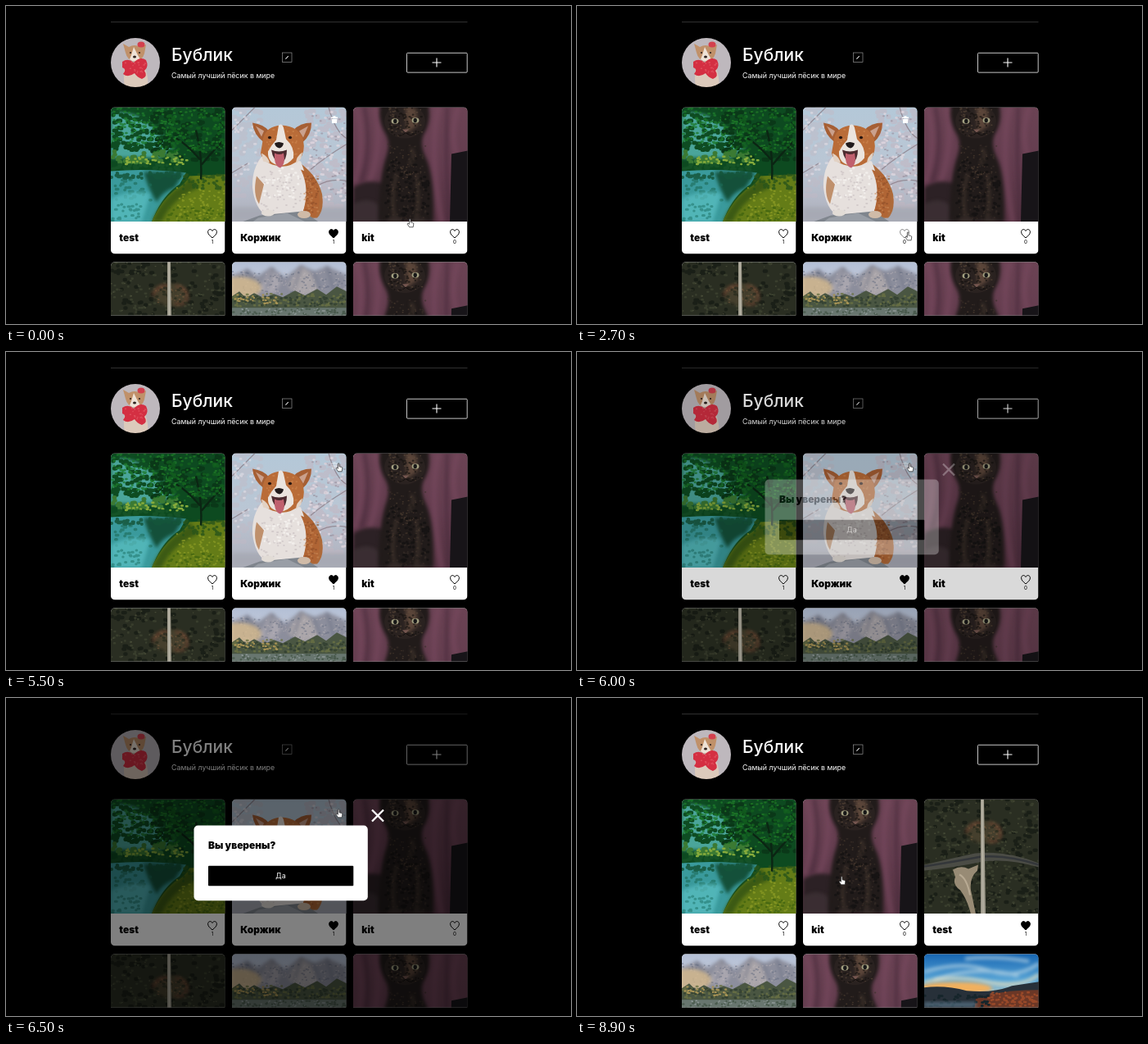
Recreate the animation shown at these times as an HTML page. Size 690x388 px, loop 9.3 s.

```html
<!DOCTYPE html>
<html lang="ru">
<head>
<meta charset="utf-8">
<style>
  html, body { margin: 0; width: 100%; height: 100%; overflow: hidden; background: #000; }
  svg { display: block; width: 100%; height: 100%; font-family: Inter, Roboto, sans-serif; }
</style>
</head>
<body>
<svg id="stage" viewBox="0 0 690 388"></svg>
<script>
const LOOP = 9300, STEP = 100;

function random(seed) {
  return () => (seed = (seed * 16807) % 2147483647) / 2147483647;
}

// Scatters round specks of one colour over a box.
function specks(seed, count, [x, y, w, h], color, size, opacity = 1) {
  const next = random(seed * 7919 + 13);
  let d = '';
  for (let i = 0; i < count; i++) {
    d += `M${(x + next() * w).toFixed(1)} ${(y + next() * h).toFixed(1)}h${(next() * size * .7).toFixed(1)}`;
  }
  return `<path d="${d}" fill="none" stroke="${color}" stroke-width="${size}" stroke-linecap="round" opacity="${opacity}"/>`;
}

const shape = (d, fill, extra = '') => `<path d="${d}" fill="${fill}" ${extra}/>`;
const line = (d, color, width, extra = '') =>
  `<path d="${d}" fill="none" stroke="${color}" stroke-width="${width}" ${extra}/>`;
const oval = (x, y, rx, ry, fill, extra = '') =>
  `<ellipse cx="${x}" cy="${y}" rx="${rx}" ry="${ry}" fill="${fill}" ${extra}/>`;
const rect = (x, y, w, h, fill, extra = '') =>
  `<rect x="${x}" y="${y}" width="${w}" height="${h}" fill="${fill}" ${extra}/>`;
const label = (x, y, size, weight, fill, text, extra = '') =>
  `<text x="${x}" y="${y}" font-size="${size}" font-weight="${weight}" fill="${fill}" ${extra}>${text}</text>`;
const gradient = (id, ...colors) => `<linearGradient id="${id}" x2="0" y2="1">` +
  colors.map((c, i) => `<stop offset="${i / (colors.length - 1)}" stop-color="${c}"/>`).join('') +
  '</linearGradient>';

const soft = 'filter="url(#soft)"';

const photos = {
  lake: () =>
    rect(0, 0, 140, 140, '#0d4a20') +
    shape('M0 8Q25 2 50 22L78 48L60 62H0Z', '#4aa59a', soft) +
    specks(1, 110, [0, 0, 70, 52], '#0e4c22', 5) +
    specks(2, 130, [0, 0, 80, 45], '#1d7a2c', 2.5, .8) +
    specks(3, 110, [50, 0, 90, 66], '#0a3818', 5) +
    specks(4, 150, [50, 0, 90, 60], '#1f7a26', 2.2, .8) +
    specks(5, 40, [0, 54, 80, 14], '#3b7a33', 5) +
    specks(6, 40, [15, 60, 80, 10], '#86ab3c', 2.5) +
    specks(13, 35, [0, 70, 85, 6], '#155327', 4) +
    shape('M0 78Q45 74 92 80L84 94Q62 108 50 140H0Z', '#3a9a9c') +
    shape('M40 79H90L78 98Q62 104 56 116Q46 100 40 79Z', '#14503a', soft) +
    specks(7, 40, [0, 79, 84, 8], '#14553a', 4, .85) +
    specks(8, 30, [0, 88, 48, 26], '#1d6c58', 3.5, .6) +
    shape('M0 112Q30 98 48 106L38 140H0Z', '#5cc0c4', soft + ' opacity=".7"') +
    specks(14, 26, [0, 118, 38, 20], '#247a70', 3, .6) +
    shape('M140 82L96 84Q92 94 78 101Q60 116 50 140H140Z', '#647c17') +
    shape('M96 84Q92 94 78 101Q60 116 50 140H62Q74 112 108 98Z', '#3c5a14', soft) +
    specks(9, 90, [80, 98, 60, 40], '#8c9c24', 2, .75) +
    specks(10, 60, [88, 82, 52, 18], '#28541a', 3, .8) +
    specks(11, 45, [68, 122, 72, 18], '#42640f', 2.5, .8) +
    line('M110 88Q112 60 104 28M111 70Q124 54 136 42M109 64Q94 46 80 38', '#0b2513', 2.4) +
    specks(12, 70, [66, 10, 74, 45], '#12601f', 3.5, .8),

  dog: () =>
    rect(0, 0, 140, 140, 'url(#blossomSky)') +
    specks(20, 60, [0, 0, 34, 110], '#c2b9c4', 6, .45) +
    specks(21, 100, [90, 0, 50, 122], '#c3b6c2', 6, .55) +
    line('M140 45Q112 62 96 76M140 90Q120 86 104 96M118 0Q126 30 140 38M0 28Q18 10 28 0M0 80L20 68', '#85757f', 1.3, 'opacity=".7"') +
    specks(25, 50, [96, 10, 44, 100], '#8f828f', 2, .5) +
    specks(22, 70, [90, 5, 50, 110], '#e2d9e1', 2.8, .75) +
    specks(23, 36, [0, 0, 34, 90], '#e0dde5', 2.8, .65) +
    rect(0, 122, 140, 18, '#a3a6b0', soft + ' opacity=".7"') +
    shape('M80 66Q104 82 110 106Q113 126 104 135L76 136Z', '#ad6a3a') +
    shape('M38 58Q24 74 25 98Q28 124 42 132L84 134Q99 103 84 66Z', '#e6e0dd') +
    specks(24, 60, [34, 78, 50, 50], '#c6bfc0', 2, .6) +
    specks(26, 40, [38, 74, 44, 36], '#f8f5f2', 2.5, .7) +
    shape('M30 84Q25 106 33 118L39 94Z', '#b67c50', 'opacity=".8"') +
    shape('M84 76Q96 100 86 130L102 134Q113 110 98 82Z', '#b06535') +
    specks(27, 45, [88, 84, 17, 45], '#8d4d28', 2, .6) +
    specks(28, 30, [88, 84, 17, 45], '#cc8a58', 1.8, .6) +
    shape('M25 19Q39 21 45 29L39 43Q26 33 25 19Z', '#a65f34') +
    shape('M97 19Q83 19 75 28L86 43Q97 34 97 19Z', '#a65f34') +
    shape('M29 23L39 29L36 36Z', '#caa08c') + shape('M93 23L82 29L87 37Z', '#caa08c') +
    shape('M38 38Q42 23 60 22Q82 23 87 40Q90 55 82 64Q70 74 58 72Q38 69 35 56Z', '#b96c38') +
    shape('M36 56Q44 60 46 68L38 66ZM86 55Q78 60 78 69L84 63Z', '#e2d2c4') +
    specks(29, 45, [42, 27, 40, 32], '#cf8850', 2, .6) +
    shape('M57 22Q61 19 63 25L66 39Q77 49 75 62Q67 72 57 71Q43 68 44 54Q48 46 54 40Z', '#ebe4de') +
    oval(46, 37, 2.1, 1.8, '#261510') + oval(71, 37, 2.1, 1.8, '#261510') +
    shape('M52 44Q57 41 63 44Q62 49 58 50Q53 49 52 44Z', '#211b1c') +
    shape('M48 52Q57 56 67 52Q67 64 60 69Q50 66 48 52Z', '#4c2b2f') +
    shape('M52 56Q58 59 63 56Q66 70 59 74Q51 72 52 56Z', '#c0606e') +
    shape('M12 140L34 132L86 127L106 140Z', '#7f858d') +
    shape('M32 135L67 129L90 140H25Z', '#999ea6') +
    oval(44, 129, 8, 4, '#e2dcd6') + oval(88, 131, 8, 4.5, '#d0bba8'),

  cat: () =>
    rect(0, 0, 140, 140, 'url(#curtain)') +
    line('M4 0Q16 46 2 92M28 0Q36 46 20 92M104 0Q92 50 108 140M128 0Q118 32 126 58', '#7a4a60', 7, soft + ' opacity=".5"') +
    line('M14 0Q24 50 10 90M115 0Q112 50 117 140', '#46293a', 4, soft + ' opacity=".6"') +
    shape('M0 98Q18 86 42 94V140H0Z', '#2c2125', soft) +
    shape('M0 118Q20 108 32 120V140H0Z', '#403438', soft + ' opacity=".7"') +
    shape('M120 57L140 53V140H118Z', '#171418') +
    shape('M38 30Q27 8 36 -12L90 -12Q97 13 88 30Q80 42 88 60Q99 81 98 140H31Q31 85 41 58Q46 42 38 30Z', '#211b1a', soft) +
    specks(30, 110, [42, 45, 46, 92], '#3a2f29', 1.8, .65) +
    specks(31, 50, [45, 50, 38, 55], '#5c4838', 1.4, .6) +
    specks(32, 90, [38, 62, 54, 76], '#121011', 3, .7) +
    oval(63, 17, 25, 21, '#2a2220') +
    shape('M64 -4L77 3L79 22L65 32Z', '#6b5142', soft + ' opacity=".75"') +
    specks(33, 50, [42, 0, 42, 35], '#65503f', 1.6, .55) +
    specks(34, 45, [42, 0, 42, 35], '#151110', 2.2, .65) +
    oval(51, 17, 4.4, 3.3, '#a29f80') + oval(76, 16, 4.4, 3.3, '#a29f80') +
    oval(51.3, 17, 2.2, 2.8, '#181818') + oval(75.7, 16, 2.2, 2.8, '#181818') +
    shape('M60 27H68L64 31Z', '#765750') + line('M64 31Q59 36 55 34M64 31Q70 36 73 33', '#120e0d', 1) +
    line('M70 50Q78 58 68 70M53 81Q45 113 51 135M77 82Q82 116 77 136', '#4f4036', 3, soft + ' opacity=".7"') +
    oval(51, 137, 9, 4, '#342a27', soft) + oval(79, 138, 9, 4, '#342a27', soft),

  road: () =>
    rect(0, 0, 140, 140, '#2a2e22') +
    specks(40, 200, [0, 0, 140, 140], '#171c15', 4.5, .8) +
    specks(41, 200, [0, 0, 140, 140], '#3e4330', 2.6, .75) +
    specks(42, 110, [0, 0, 140, 140], '#53563f', 1.4, .7) +
    shape('M0 80Q35 72 62 66Q100 62 140 78V83Q103 72 72 76Q34 84 0 87Z', '#4b4c45') +
    line('M0 82Q38 76 70 70Q102 68 140 80', '#34373a', 2.5) +
    oval(73, 40, 21, 14, '#4c4430', soft + ' opacity=".8"') +
    line('M51 41Q56 28 70 29M79 29Q95 32 93 46Q89 54 78 51', '#7c4532', 2.5, soft + ' opacity=".8"') +
    specks(43, 26, [54, 30, 38, 20], '#70543a', 1.6, .7) +
    specks(44, 16, [54, 30, 38, 20], '#272a1d', 3, .7) +
    shape('M35 86Q45 80 54 85L66 80L65 87Q55 96 57 111L63 140H57Q52 121 44 111Q34 104 38 95Z', '#988b75') +
    line('M43 92Q52 96 56 117', '#b8aa93', 2) +
    shape('M69 0H73L75 140H69Z', '#9f9b8d') +
    line('M71 0L72 140', '#c4c0b2', 1),

  mountains: () =>
    rect(0, 0, 140, 140, 'url(#haze)') +
    shape('M0 17L18 9L32 17L48 6L65 19L84 4L101 11L116 5L140 16V70H0Z', '#8c8e9c', soft) +
    shape('M84 5L98 15L108 37L80 43L68 29Z', '#aaa5a9', soft) +
    shape('M48 7L60 25L51 40L33 34Z', '#a8a5ae', soft) +
    line('M18 9L31 34M50 8L42 33M85 6L75 34M99 13L108 36M116 6L125 36', '#686f83', 2.5, soft + ' opacity=".7"') +
    specks(50, 110, [0, 12, 140, 28], '#b9b4b8', 1.6, .5) +
    specks(51, 100, [0, 12, 140, 28], '#636b7e', 1.8, .5) +
    oval(8, 32, 28, 14, '#e2c28c', soft + ' opacity=".7"') +
    shape('M0 42L9 36L17 44L27 38L39 44L51 39L62 43L77 35L89 41L104 33L115 40L128 30L140 36V60H0Z', '#4a5642') +
    specks(52, 100, [0, 39, 140, 15], '#6b7244', 2.5, .8) +
    specks(53, 80, [0, 42, 140, 12], '#303e30', 2.6, .8) +
    specks(54, 30, [0, 40, 55, 11], '#a69255', 2.2) +
    rect(0, 56, 140, 84, '#68766f') +
    specks(55, 70, [0, 57, 140, 9], '#3e5040', 2.2, .7) +
    specks(56, 40, [10, 57, 120, 9], '#a0a9aa', 1.6, .65),

  sunset: () =>
    rect(0, 0, 140, 140, 'url(#eveningSky)') +
    line('M0 22Q45 8 78 20T140 12M12 32Q64 13 115 27M50 6Q85 2 128 9', '#c4dce7', 4, soft + ' opacity=".65"') +
    line('M0 35Q34 25 76 34T140 25', '#f4e5bd', 4, soft + ' opacity=".75"') +
    oval(38, 42, 45, 8, '#f0b05e', soft) +
    shape('M0 41Q26 38 52 45Q85 48 107 39L140 34V140H0Z', '#273039') +
    shape('M63 55Q92 44 140 44V140H50Z', '#6b3726') +
    specks(60, 80, [76, 47, 64, 20], '#a94f2a', 2.5, .75) +
    specks(61, 50, [0, 49, 80, 18], '#16252b', 3) +
    rect(0, 59, 64, 6, '#668499', soft + ' opacity=".65"'),
};

const heartPath = 'M0 5C-3.2 2.3-5.4 .2-5.4-2.2C-5.4-6-1.4-6.4 0-3.5C1.4-6.4 5.4-6 5.4-2.2C5.4 .2 3.2 2.3 0 5Z';

const cards = [
  { photo: 'lake', title: 'test', likes: 1 },
  { photo: 'dog', title: 'Коржик', likes: 1, liked: true, own: true },
  { photo: 'cat', title: 'kit', likes: 0 },
  { photo: 'road', title: 'test', likes: 1, liked: true },
  { photo: 'mountains', title: 'test', likes: 0 },
  { photo: 'cat', title: 'kit', likes: 0 },
  { photo: 'sunset', title: 'test', likes: 0 },
];

const trash = `<g id="trash">${shape('M121 12H123.5V10.8H126.5V12H129V13.4H121ZM121.6 14.2H128.4L127.9 19.5H122.1Z', '#fff')}</g>`;

const drawCard = (card, i) => `<g id="card${i}"><g clip-path="url(#cardClip)">
  ${rect(0, 0, 139.5, 179, '#fff')}
  <use href="#${card.photo}" clip-path="url(#photoClip)"/>
  ${card.own ? trash : ''}
  ${label(10.3, 163.3, 11.9, 900, '#000', card.title)}
  <path class="heart" d="${heartPath}" transform="translate(124 154.5)" fill="${card.liked ? '#000' : '#fff'}" stroke="#000"/>
  ${label(124, 166.7, 6.2, 400, '#000', card.likes, 'class="count" text-anchor="middle"')}
</g></g>`;

const avatar = `<g clip-path="url(#avatarClip)"><g filter="url(#lens)">
  ${rect(120, 30, 76, 76, '#beb8bd')}
  ${shape('M145 74Q142 98 148 104H173Q175 84 168 73Z', '#dccabb')}
  ${shape('M143 46L150 50Q157 46 164 50L171 47L169 58Q166 68 157 68Q148 66 146 57Z', '#c0916a')}
  ${shape('M156 50L161 60L164 65Q157 70 151 65L153 60Z', '#eee2d6')}
  ${oval(152, 57, 1.1, 1, '#2c211e')}${oval(163, 57, 1.1, 1, '#2c211e')}${oval(157, 62, 2, 1.5, '#2c211e')}
  ${oval(165, 47, 4.5, 3.5, '#d3404e')}
  ${shape('M142 68Q149 63 156 69Q164 61 171 66Q175 74 169 79Q174 86 166 89Q160 87 157 82Q149 88 143 83Q148 77 142 75Z', '#d42f42')}
  ${specks(70, 20, [145, 68, 25, 14], '#e8606c', 1.6, .6)}
</g></g>`;

const stage = document.getElementById('stage');
stage.innerHTML = `<defs>
  <filter id="soft" x="-30%" y="-30%" width="160%" height="160%" color-interpolation-filters="sRGB"><feGaussianBlur stdDeviation="2"/></filter>
  <filter id="lens" color-interpolation-filters="sRGB"><feGaussianBlur stdDeviation=".6"/></filter>
  ${gradient('blossomSky', '#b4c8d8', '#bac6d4', '#b0b0bc')}
  ${gradient('curtain', '#6b4354', '#643d4f', '#553342')}
  ${gradient('haze', '#b4c0d6', '#d6d4da', '#b5aaa2')}
  <linearGradient id="eveningSky" x2="0" y2=".4"><stop stop-color="#1766b2"/><stop offset=".6" stop-color="#5ca8d8"/><stop offset="1" stop-color="#d7d2b5"/></linearGradient>
  <clipPath id="cardClip"><rect width="139.5" height="179" rx="5"/></clipPath>
  <clipPath id="photoClip"><rect width="140" height="139.5"/></clipPath>
  <clipPath id="avatarClip"><circle cx="158" cy="69" r="30"/></clipPath>
  <clipPath id="frameClip"><rect x="-4" y="-4" width="148" height="148"/></clipPath>
  <clipPath id="pageClip"><rect width="690" height="377.5"/></clipPath>
  ${Object.entries(photos).map(([id, draw]) =>
    `<g id="${id}"><g filter="url(#lens)"><g clip-path="url(#frameClip)">${rect(-4, -4, 148, 148, '#333')}${draw()}</g></g></g>`).join('')}
</defs>
${rect(0, 0, 690, 388, '#000')}
${rect(128, 19, 435.5, 1, '#303030')}
${avatar}
${label(202, 67.2, 21, 500, '#fff', 'Бублик')}
${label(202, 88.2, 8.88, 400, '#fff', 'Самый лучший пёсик в мире')}
${rect(337.5, 57, 11.5, 11.5, 'none', 'stroke="#aaa" stroke-width=".6"')}
${line('M341.4 64.6L344.8 61.2', '#ddd', 1.1)}
${rect(489.5, 57.3, 73.7, 23.8, 'none', 'rx="1" stroke="#ddd" stroke-width=".9"')}
${line('M520.5 69H531.5M526 63.5V74.5', '#fff', 1.1)}
<g clip-path="url(#pageClip)">${cards.map(drawCard).join('')}</g>
<g id="shade">${rect(0, 0, 690, 388, '#000', 'opacity=".5"')}</g>
<g id="popup">
  ${rect(229.5, 155.5, 212.3, 91.7, '#fff', 'rx="5"')}
  ${label(247, 183.6, 11.9, 900, '#000', 'Вы уверены?')}
  <g id="confirm">${rect(247, 204.8, 177.3, 24.5, '#000', 'rx="1"')}
  ${label(335.5, 220.3, 8.95, 400, '#fff', 'Да', 'text-anchor="middle"')}</g>
  ${line('M447 136.5L461 150.5M461 136.5L447 150.5', '#fff', 2.3)}
</g>
<g id="cursor">${shape('M-1.6-4.2Q-1.6-5.3-.8-5.3Q0-5.3 0-4.2V-1.2L2.8-.6Q4-.3 3.8 1L3.2 4.8H-1.4L-3.8 1.2Q-3.8 0-2.7.3L-1.6 1.3Z', '#fff', 'stroke="#222" stroke-width=".7" stroke-linejoin="round"')}</g>`;

const $ = selector => stage.querySelector(selector);
const cardNodes = cards.map((_, i) => $(`#card${i}`));
const dogHeart = $('#card1 .heart'), dogCount = $('#card1 .count');

// Cursor stops: time, x, y.
const path = [
  [0, 494, 265], [100, 494, 265], [1000, 405, 284], [1300, 403, 282.5], [1900, 403, 282.5],
  [2800, 405, 281], [4400, 405, 281], [5400, 407, 141], [6600, 407, 141], [7800, 324, 223],
];

const clamp = v => Math.min(1, Math.max(0, v));
const ease = v => v * v * (3 - 2 * v);

function cursorAt(time) {
  const next = path.findIndex(stop => stop[0] > time);
  if (next < 0) return path[path.length - 1].slice(1);
  const [t0, x0, y0] = path[next - 1], [t1, x1, y1] = path[next];
  const k = ease((time - t0) / (t1 - t0));
  return [x0 + (x1 - x0) * k, y0 + (y1 - y0) * k];
}

function render(time) {
  const [x, y] = cursorAt(time);
  $('#cursor').setAttribute('transform', `translate(${x} ${y})`);

  const removed = time >= 8400;
  cardNodes.forEach((node, i) => {
    const slot = removed && i > 1 ? i - 1 : i;
    const hidden = slot > 5 || (removed && i === 1);
    node.setAttribute('display', hidden ? 'none' : 'inline');
    node.setAttribute('transform', `translate(${128 + slot % 3 * 148} ${123.5 + Math.floor(slot / 3) * 188.7})`);
  });

  const liked = time < 1900 || time >= 3600;
  const overHeart = Math.abs(x - 400) < 8 && Math.abs(y - 279) < 9;
  dogHeart.setAttribute('fill', liked ? '#000' : '#fff');
  dogHeart.setAttribute('opacity', overHeart ? .5 : 1);
  dogCount.textContent = liked ? 1 : 0;
  $('#trash').setAttribute('opacity', time >= 5400 && time < 6700 ? .4 : 1);

  const open = Math.min(clamp((time - 5900) / 340), 1 - clamp((time - 8300) / 340));
  $('#shade').setAttribute('opacity', open);
  $('#popup').setAttribute('opacity', open);
  $('#confirm').setAttribute('opacity', y > 205 && time > 7000 ? .8 : 1);
}

const start = performance.now();
let shown = -1;
function tick() {
  const time = Math.floor((performance.now() - start) % LOOP / STEP) * STEP;
  if (time !== shown) render(shown = time);
  requestAnimationFrame(tick);
}
tick();
</script>
</body>
</html>
```
